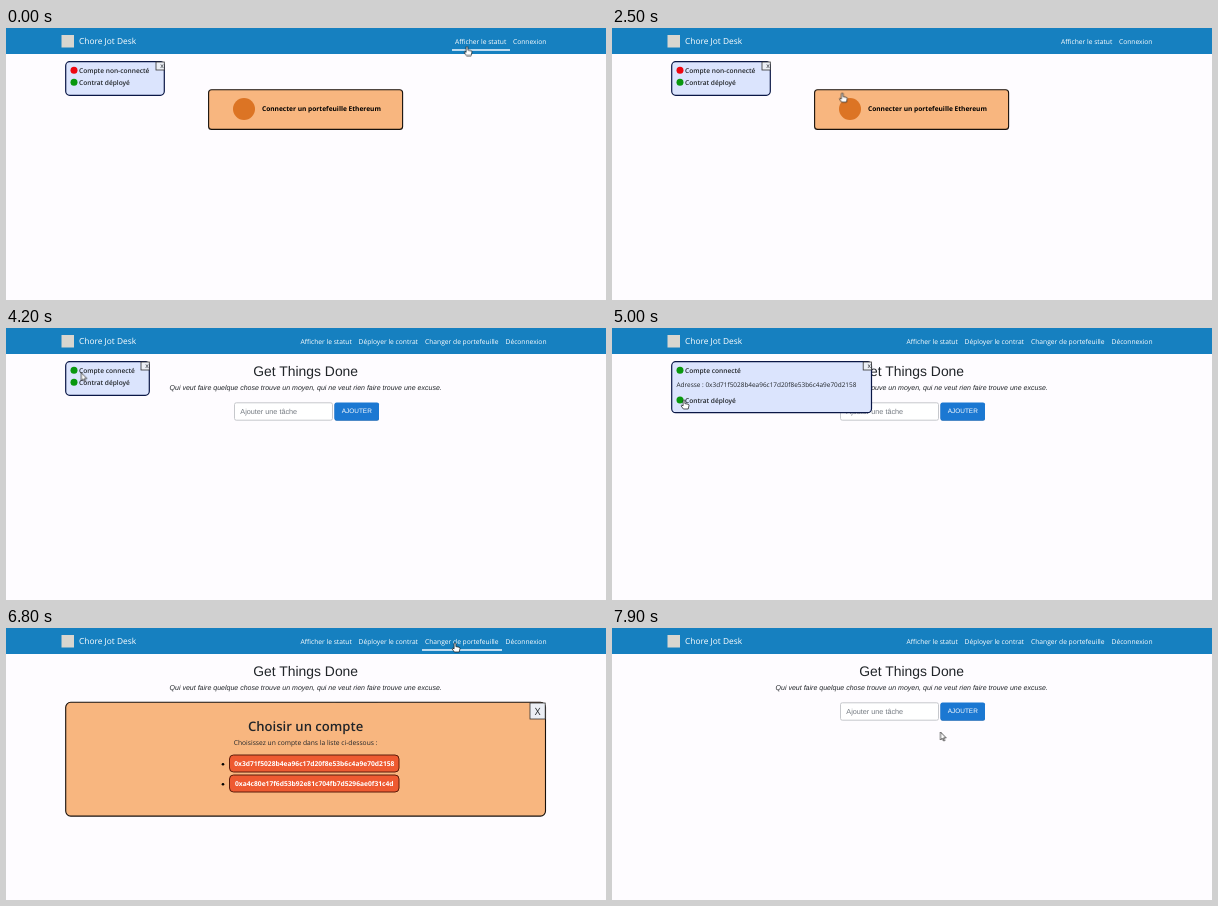
Write an HTML page that moves like this. It is 600 px wide and 272 px high and loops after 8 s.

```html
<!DOCTYPE html>
<html lang="fr">
<head>
<meta charset="utf-8">
<title>Liste de tâches</title>
<style>
html, body { margin: 0; width: 100%; height: 100%; overflow: hidden; background: #fefcff; }
svg { display: block; width: 600px; height: 272px; text-rendering: geometricPrecision; }
text { font: 6.7px "Open Sans", "Noto Sans", sans-serif; fill: #212529; }
.nav text { font-size: 6.7px; font-weight: 500; fill: #fff; }
.nav .brand { font-size: 8.35px; }
.status text { font-size: 6.45px; }
.status .label { font-size: 6.6px; font-weight: 600; }
.status .x { font-size: 6px; text-anchor: middle; }
.sheet { fill: #dbe4fd; stroke: #0a1746; stroke-width: 1.2; }
.close { fill: #eceff5; stroke: #333; stroke-width: .8; }
.peach { fill: #f8b67f; stroke: #17110c; stroke-width: 1.1; }
.key { fill: #ee5a31; stroke: #5c1d0b; }
.ok { fill: #0a980f; }
.off { fill: #ee0711; }
.line { stroke: #f2f9ff; stroke-width: 1.3; }
.mid { text-anchor: middle; }
.arial { font-family: "Liberation Sans", Arial, sans-serif; }
.bold { font-weight: 700; }
.white { fill: #fff; }

/* One loop is 8 s, so 1.25% is a tenth of a second. */
.t { visibility: hidden; animation: 8s step-end infinite; }
.guest { animation-name: guest; }
.member { animation-name: member; }
.small { animation-name: small; }
.wide { animation-name: wide; }
.tall { animation-name: tall; }
.details { animation-name: details; }
.accounts { animation-name: accounts; }
.on-status { animation-name: on-status; }
.on-wallet { animation-name: on-wallet; }
.on-input { animation-name: on-input; }
.hand { animation-name: hand; }
.beam { animation-name: beam; }
.arrow { animation-name: arrow; }
.cursor { animation: move 8s ease-in-out infinite; }

@keyframes guest { 0% { visibility: visible } 37.5%, to { visibility: hidden } }
@keyframes member { 0% { visibility: hidden } 37.5%, to { visibility: visible } }
@keyframes small { 37.5% { visibility: visible } 55%, to { visibility: hidden } }
@keyframes wide { 55% { visibility: visible } 65%, to { visibility: hidden } }
@keyframes tall { 65% { visibility: visible } 75%, to { visibility: hidden } }
@keyframes details { 55% { visibility: visible } 75%, to { visibility: hidden } }
@keyframes accounts { 82.5% { visibility: visible } 95%, to { visibility: hidden } }
@keyframes on-status { 0% { visibility: visible } 5%, to { visibility: hidden } }
@keyframes on-wallet { 80% { visibility: visible } 87.5%, to { visibility: hidden } }
@keyframes on-input { 37.5% { visibility: visible } 42.5%, to { visibility: hidden } }
@keyframes hand {
  0%, 30%, 53.75%, 61.25%, 72.5%, 80%, 91.25% { visibility: visible }
  5%, 37.5%, 56.25%, 67.5%, 75%, 87.5%, 95%, to { visibility: hidden }
}
@keyframes beam {
  11.25%, 37.5%, 56.25% { visibility: visible }
  22.5%, 42.5%, 61.25%, to { visibility: hidden }
}
@keyframes arrow {
  5%, 22.5%, 42.5%, 67.5%, 75%, 87.5%, 95%, to { visibility: visible }
  0%, 11.25%, 30%, 53.75%, 72.5%, 80%, 91.25% { visibility: hidden }
}
@keyframes move {
  0%, 3.75% { transform: translate(461px, 18.5px) }
  12.5%, 18.75% { transform: translate(95px, 50px) }
  20% { transform: translate(95px, 50px); animation-timing-function: ease-in }
  31.25% { transform: translate(230px, 65px); animation-timing-function: ease-out }
  35%, 40% { transform: translate(281px, 92.5px) }
  42.5% { transform: translate(276px, 97px) }
  45% { transform: translate(250px, 84px) }
  53.75%, 56.25% { transform: translate(68px, 43px) }
  61.25%, 66.25% { transform: translate(72px, 72px) }
  73.75%, 75% { transform: translate(255px, 38px) }
  80%, 86.25% { transform: translate(449px, 15px) }
  92.5%, 95% { transform: translate(312px, 154px) }
  98.75%, to { transform: translate(328.5px, 104px) }
}
</style>
</head>
<body>
<svg viewBox="0 0 600 272">
  <defs>
    <circle id="dot" r="3.5"/>
    <g id="x">
      <rect class="close" x="-8.3" y="34" width="8.3" height="8"/>
      <text class="x" x="-4.1" y="40">x</text>
    </g>
    <rect id="key" class="key" x="223.5" width="169.5" height="17" rx="4"/>
  </defs>

  <g class="nav">
    <rect width="600" height="26" fill="#1680c0"/>
    <rect x="55.5" y="7" width="12.5" height="12.5" fill="#d9d6cf"/>
    <text class="brand" x="73" y="16.2">Chore Jot Desk</text>
    <g class="t guest">
      <text x="449" y="15.6">Afficher le statut</text>
      <text x="507" y="15.6">Connexion</text>
    </g>
    <g class="t member">
      <text x="294.5" y="15.6">Afficher le statut</text>
      <text x="352.5" y="15.6">Déployer le contrat</text>
      <text x="419" y="15.6">Changer de portefeuille</text>
      <text x="499.5" y="15.6">Déconnexion</text>
    </g>
    <path class="t on-status line" d="M446 22h58"/>
    <path class="t on-wallet line" d="M416 22h80"/>
  </g>

  <g class="t guest">
    <rect class="peach" x="202.6" y="61.8" width="194" height="39.6" rx="3"/>
    <circle cx="238" cy="81" r="11" fill="#dc7424"/>
    <text class="bold" x="256" y="83.3" style="font-size:6.6px;fill:#000">Connecter un portefeuille Ethereum</text>
  </g>

  <g class="t member">
    <text class="arial mid" x="299.7" y="48.2" style="font-size:13.9px">Get Things Done</text>
    <text class="arial mid" x="299.7" y="61.6" style="font-size:7.03px;font-style:italic">Qui veut faire quelque chose trouve un moyen, qui ne veut rien faire trouve une excuse.</text>
    <rect x="228.5" y="74.8" width="98" height="17.4" rx="1.8" fill="#fff" stroke="#c6c8cc"/>
    <text class="arial" x="234.3" y="86" style="font-size:7.25px;fill:#757b82">Ajouter une tâche</text>
    <rect x="328.5" y="75" width="44.5" height="17.8" rx="2" fill="#1565b5"/>
    <rect x="328.5" y="74.5" width="44.5" height="17.5" rx="2" fill="#1b78d2"/>
    <text class="arial mid white" x="350.8" y="85.4" style="font-size:6.43px;fill:#fff">AJOUTER</text>
  </g>
  <rect class="t on-input" x="228.5" y="74.8" width="98" height="17.4" rx="1.8" fill="none" stroke="#4b5058"/>

  <g class="status">
    <g class="t guest">
      <rect class="sheet" x="59.7" y="33.7" width="98.6" height="33.6" rx="4"/>
      <use href="#x" x="158.3"/>
      <use href="#dot" class="off" x="68" y="42.2"/>
      <text class="label" x="73" y="45.2">Compte non-connecté</text>
      <use href="#dot" class="ok" x="68" y="54.3"/>
      <text class="label" x="73" y="57.3">Contrat déployé</text>
    </g>
    <g class="t small">
      <rect class="sheet" x="59.7" y="33.7" width="83.6" height="33.6" rx="4"/>
      <use href="#x" x="143.3"/>
      <use href="#dot" class="ok" x="68" y="42.2"/>
      <text class="label" x="73" y="45.2">Compte connecté</text>
      <use href="#dot" class="ok" x="68" y="54.3"/>
      <text class="label" x="73" y="57.3">Contrat déployé</text>
    </g>
    <rect class="t wide sheet" x="59.7" y="33.7" width="199.8" height="51" rx="4"/>
    <g class="t tall">
      <rect class="sheet" x="59.7" y="33.7" width="199.8" height="68.8" rx="4"/>
      <text x="64.5" y="88.6">Adresse : 0x5b90e4c2d7a1836f0e92b4d86ca51f37e20d49b8</text>
    </g>
    <g class="t details">
      <use href="#x" x="259.5"/>
      <use href="#dot" class="ok" x="68" y="42.2"/>
      <text class="label" x="73" y="45.2">Compte connecté</text>
      <text x="64.5" y="58.6">Adresse : 0x3d71f5028b4ea96c17d20f8e53b6c4a9e70d2158</text>
      <use href="#dot" class="ok" x="68" y="72"/>
      <text class="label" x="73" y="75">Contrat déployé</text>
    </g>
  </g>

  <g class="t accounts">
    <rect class="peach" x="59.7" y="74.3" width="479.8" height="113.8" rx="5"/>
    <rect class="close" x="524" y="75" width="15.2" height="16"/>
    <text class="mid" x="531.6" y="87" style="font-size:10px">X</text>
    <text class="mid" x="299.6" y="103" style="font-size:13.1px;font-weight:600">Choisir un compte</text>
    <text class="mid" x="299.6" y="117.3">Choisissez un compte dans la liste ci-dessous :</text>
    <circle cx="217" cy="136.3" r="1.3"/>
    <circle cx="217" cy="156.3" r="1.3"/>
    <use href="#key" y="127"/>
    <use href="#key" y="147"/>
    <text class="bold mid white" x="308.3" y="138">0x3d71f5028b4ea96c17d20f8e53b6c4a9e70d2158</text>
    <text class="bold mid white" x="308.3" y="158">0xa4c80e17f6d53b92e81c704fb7d5296ae0f31c4d</text>
  </g>

  <g class="cursor" stroke="#111" stroke-width=".7" fill="#fff" stroke-linejoin="round">
    <path class="t hand" d="M-.9.8a.9.9 0 0 1 1.8 0V3.6L4 4.2Q5 4.5 5 5.5L4.2 9H-.6L-3 5.8Q-2.6 4.5-.9 5.8Z"/>
    <path class="t beam" fill="none" d="M-1.5-3.5h3M0-3.5v7M-1.5 3.5h3"/>
    <path class="t arrow" d="M0 0V8L1.9 6.3 3.1 9 4.3 8.5 3.1 5.9H5.6Z"/>
  </g>
</svg>
</body>
</html>
```
